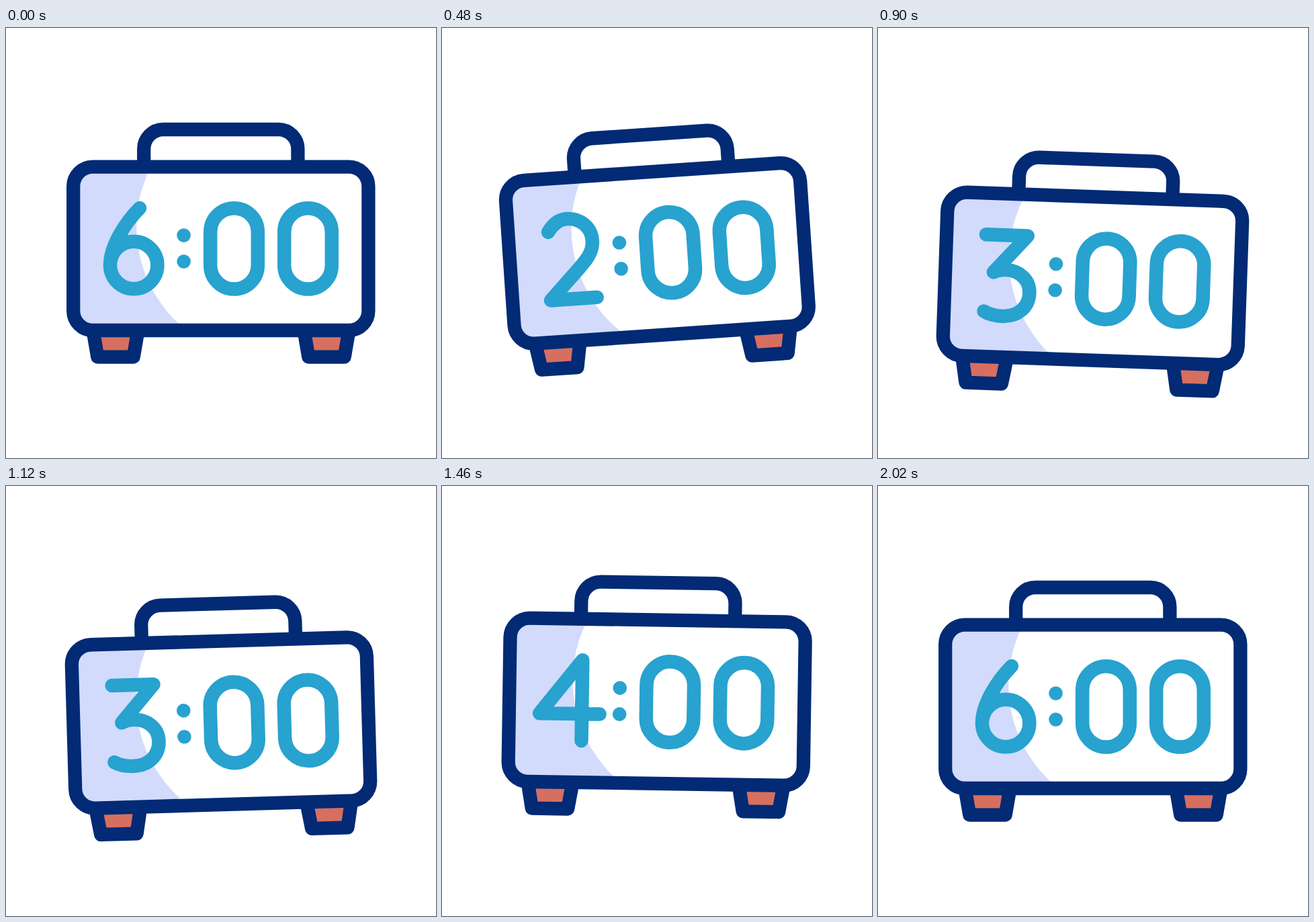
These frames come from a looping animation (640 px wide and 640 px high, 3020 ms). An HTML page:

```html
<!DOCTYPE html>
<html lang="en">
<head>
<meta charset="utf-8">
<title>Shaking alarm clock</title>
<style>
  html, body { margin: 0; width: 100%; height: 100%; overflow: hidden; background: #fff; }
  svg { display: block; width: 100%; height: 100%; }
  .frame { fill: none; stroke: #022a75; stroke-width: 20.3; stroke-linejoin: round; }
  .foot { fill: #d66f60; }
  .digits { fill: none; stroke: #28a2cf; stroke-width: 20.5; stroke-linecap: round; stroke-linejoin: round; }
  .shade { fill: #d2dbfc; }
  .dot { fill: #28a2cf; stroke: none; }
</style>
</head>
<body>
<svg viewBox="0 0 640 640">
  <defs>
    <path id="foot" class="frame foot" d="M-33.5 450L-26.7 489.6H26.7L33.5 450"/>
    <rect id="zero" y="268.2" width="70.6" height="120.4" rx="35.3"/>
  </defs>
  <g id="clock">
    <use href="#foot" x="163"/>
    <use href="#foot" x="477"/>
    <path class="frame" d="M205.2 206V180a29 29 0 0 1 29-29H405.4a29 29 0 0 1 29 29V206"/>
    <path class="shade" d="M129 208H215A197 197 0 0 0 266 448H129a27 27 0 0 1-27-27V235a27 27 0 0 1 27-27Z"/>
    <rect class="frame" x="100.2" y="206.6" width="439.2" height="243.4" rx="29"/>
    <g class="digits">
      <path id="hour"/>
      <use href="#zero" x="304.2"/>
      <use href="#zero" x="414.2"/>
      <circle class="dot" cx="264.6" cy="308.6" r="10.3"/>
      <circle class="dot" cx="264.6" cy="347.6" r="10.3"/>
    </g>
  </g>
</svg>
<script>
  const LOOP = 3020, STEP = 20;
  const clock = document.getElementById('clock');
  const hour = document.getElementById('hour');

  const glyphs = {
    1: 'M170 291L205 268V388',
    2: 'M160 286C168 274 178 268 189 268C209 268 224.7 283 224.7 303C224.7 320 214 331 202 343L157 387.5H226',
    3: 'M159 268.3H221L172 324C178 321 184 320 190 320C211 320 226.5 334 226.5 353C226.5 374 211 389 187 389C176 389 167 387 159.5 382.5',
    4: 'M208.5 388V268L145.5 348H235',
    5: 'M222.5 268.3H165L158.5 321.5C166 318 177 316.5 187 316.5C210 316.5 225.5 331 225.5 351C225.5 373 211 388.5 188 388.5C176 388.5 167 386 159 380.5',
    6: 'M199 268C176 291 155 326 155 353a35.2 35.2 0 1 0 70.4 0a35.2 35.2 0 1 0-70.4 0'
  };

  // Keys are [time in ms, value].
  const lift = [[0, 0], [330, 28], [665, -22], [970, 54], [1315, -21], [1655, 15], [2000, 0]];
  const tilt = [[0, 0], [450, -4], [785, 2.9], [1190, -2], [1555, 1.4], [2000, 0]];
  const hours = [[0, 6], [100, 1], [440, 2], [830, 3], [1200, 4], [1570, 5], [1860, 6]];

  const ease = p => (1 - Math.cos(Math.PI * p)) / 2;

  function tween(keys, time) {
    const next = keys.findIndex(key => key[0] > time);
    if (next < 0) return keys[keys.length - 1][1];
    const [t0, v0] = keys[next - 1], [t1, v1] = keys[next];
    return v0 + (v1 - v0) * ease((time - t0) / (t1 - t0));
  }

  const hold = (keys, time) => keys.filter(key => key[0] <= time).pop()[1];

  function draw(now) {
    const time = Math.floor((now % LOOP) / STEP) * STEP;
    clock.setAttribute('transform',
      `translate(0 ${tween(lift, time)}) rotate(${tween(tilt, time)} 320 320)`);
    hour.setAttribute('d', glyphs[hold(hours, time)]);
  }

  let start;
  function tick(now) {
    start ??= now;
    draw(now - start);
    requestAnimationFrame(tick);
  }
  draw(0);
  requestAnimationFrame(tick);
</script>
</body>
</html>
```
